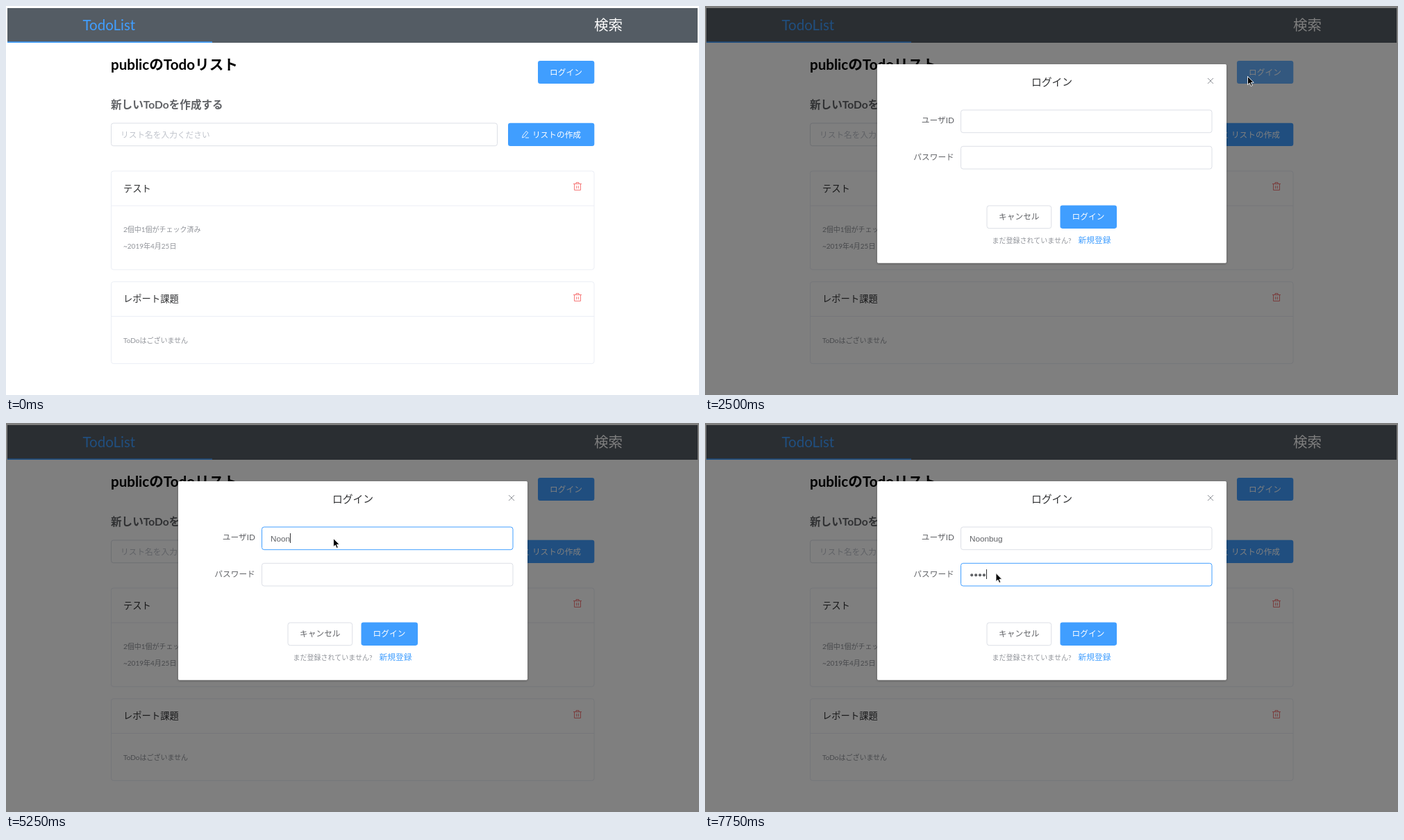
These frames come from a looping animation (998x561 px, 8000 ms). An HTML page:

```html
<!DOCTYPE html>
<html lang="ja">
<head>
<meta charset="utf-8">
<title>TodoList</title>
<style>
  html, body { margin: 0; width: 100%; height: 100%; overflow: hidden; background: #fff; }
  svg { display: block; font: 11.7px Lato, "Noto Sans CJK JP", "Noto Sans CJK", sans-serif; }
  .primary { fill: #409eff; }
  .field { fill: #fff; stroke: #dcdfe6; }
  .focus { stroke: #409eff; }
  .card { fill: none; stroke: #ebeef5; }
  .title { font-size: 13.3px; fill: #303133; }
  .note { font-size: 10px; fill: #909399; }
  .label { fill: #606266; }
  .button { font-weight: 500; text-anchor: middle; }
  .icon { fill: none; stroke: #f56c6c; stroke-width: .9; }
  #dialog { filter: drop-shadow(0 1px 1.5px rgba(0, 0, 0, .3)); }
  #user { font-family: "Liberation Sans", Arial, sans-serif; }
</style>
</head>
<body>
<svg width="998" height="561" viewBox="0 0 998 561">
  <defs>
    <path id="trash" d="M817 256.5h12M821 256v-1.5h4v1.5M818.5 257v8.5h9v-8.5M821.7 259.3v4M824.3 259.3v4"/>
  </defs>

  <rect x="2" y="3" width="994" height="50" fill="#545c64"/>
  <rect x="2" y="51.3" width="295" height="1.7" class="primary"/>
  <text x="110.5" y="35" font-size="20.5" class="primary">TodoList</text>
  <text x="847" y="35" font-size="20.5" fill="#fff">検索</text>

  <text x="151" y="92" font-size="20.6" font-weight="700">publicのTodoリスト</text>
  <rect id="loginButton" x="766" y="79" width="81.3" height="33" rx="3.3" class="primary"/>
  <text x="806.5" y="99.8" fill="#fff" class="button">ログイン</text>

  <text x="151" y="148.2" font-size="15.6" font-weight="700" class="label">新しいToDoを作成する</text>
  <rect x="151.5" y="169" width="556" height="32.7" rx="3.3" class="field"/>
  <text x="165" y="189.6" fill="#c0c4cc">リスト名を入力ください</text>
  <rect x="723" y="168.7" width="124.3" height="33.3" rx="3.3" class="primary"/>
  <path d="M743.6 190l.6-3.2 5-6.2 2.5 2-5 6.2zM748 190h5" fill="none" stroke="#fff" stroke-width=".9"/>
  <text x="793" y="189.6" fill="#fff" class="button">リストの作成</text>

  <rect x="151.5" y="238" width="695.5" height="142.2" rx="3.3" class="card"/>
  <path d="M152 288H847" class="card"/>
  <text x="169" y="267.6" class="title">テスト</text>
  <use href="#trash" class="icon"/>
  <text x="169" y="325.7" class="note">2個中1個がチェック済み</text>
  <text x="169" y="349.8" class="note">~2019年4月25日</text>

  <rect x="151.5" y="397.7" width="695.5" height="118" rx="3.3" class="card"/>
  <path d="M152 447.5H847" class="card"/>
  <text x="169" y="427.4" class="title">レポート課題</text>
  <use href="#trash" y="160" class="icon"/>
  <text x="169" y="485.5" class="note">ToDoはございません</text>

  <rect id="shade" width="998" height="561"/>
  <g id="dialog">
    <rect x="248" y="84" width="503" height="286.7" rx="1.7" fill="#fff"/>
    <text x="499.5" y="114.6" font-size="14.8" fill="#303133" text-anchor="middle">ログイン</text>
    <path d="M724 104l8 8M732 104l-8 8" stroke="#909399"/>
    <text x="358.8" y="169.4" class="label" text-anchor="end">ユーザID</text>
    <rect id="userField" x="368.5" y="150" width="361.5" height="32.7" rx="3.3" class="field"/>
    <text id="user" x="381" y="170.6" class="label"></text>
    <text x="358.8" y="222" class="label" text-anchor="end">パスワード</text>
    <rect id="passField" x="368.5" y="202.3" width="361.5" height="32.7" rx="3.3" class="field"/>
    <g id="dots" fill="#606266"></g>
    <rect id="caret" width="1" height="14" fill="#303133"/>
    <rect x="406" y="288" width="92.7" height="32.7" rx="3.3" class="field"/>
    <text x="452.3" y="308.2" class="label button">キャンセル</text>
    <rect x="511.5" y="287.6" width="81.5" height="33.3" rx="3.3" class="primary"/>
    <text x="552" y="308.2" fill="#fff" class="button">ログイン</text>
    <text x="413.5" y="341.5" class="note">まだ登録されていません?</text>
    <text x="561" y="341.7" class="primary button">新規登録</text>
  </g>
  <path id="pointer" d="M0 0V12.2L2.8 9.6 4.7 14 6.8 13.1 4.9 8.8H8.7Z" stroke="#fff" stroke-width=".9"/>
</svg>
<script>
  const DURATION = 8000, TICK = 250, USER = "Noonbug";
  const $ = id => document.getElementById(id);

  // Each track lists [start time, ...values] and holds until the next entry.
  const pointerTrack = [
    [0, -50, -50], [250, 811, -3], [500, 806, 40], [750, 790, 82], [1000, 777, 100], [1250, 793, 101],
    [1750, 787, 101], [2000, 781.5, 101.5], [3000, 700, 119], [3250, 560, 148], [3500, 471.5, 166.5],
    [6000, 452, 184], [6250, 430.5, 202.5], [6500, 419, 216.5]
  ];
  const userTrack = [[0, 0], [4250, 1], [4500, 2], [4750, 3], [5250, 4], [5500, 6], [5750, 7]];
  const dotTrack = [[0, 0], [7000, 1], [7250, 2], [7500, 3], [7750, 4]];
  const at = (track, t) => track.filter(key => key[0] <= t).pop().slice(1);

  function draw(t) {
    const [x, y] = at(pointerTrack, t), [typed] = at(userTrack, t), [dots] = at(dotTrack, t);
    $("pointer").setAttribute("transform", `translate(${x} ${y})`);
    $("loginButton").style.fill = t >= 2000 && t < 3000 ? "#66b1ff" : "";

    const shown = t < 2250 ? 0 : t < 2500 ? 0.08 : 1;
    $("shade").style.opacity = shown / 2;
    $("dialog").style.opacity = shown;
    $("dialog").setAttribute("transform", `translate(0 ${-16.7 * (1 - shown)})`);

    const onUser = t >= 3500 && t < 6750, onPass = t >= 6750;
    $("userField").classList.toggle("focus", onUser);
    $("passField").classList.toggle("focus", onPass);
    $("user").textContent = USER.slice(0, typed);
    $("dots").innerHTML = Array.from({ length: dots }, (_, i) =>
      `<circle cx="${384.2 + 5.9 * i}" cy="219.3" r="2.1"/>`).join("");

    const caret = $("caret");
    caret.style.opacity = onPass ? +(dots > 0) : +(typed > 0 && t < 6250);
    caret.setAttribute("x", onPass ? 381.4 + 5.9 * dots : 381 + $("user").getComputedTextLength());
    caret.setAttribute("y", onPass ? 211 : 159);
  }

  let last = -1;
  function loop() {
    const t = Math.floor(performance.now() % DURATION / TICK) * TICK;
    if (t !== last) draw(last = t);
    requestAnimationFrame(loop);
  }
  loop();
</script>
</body>
</html>
```
